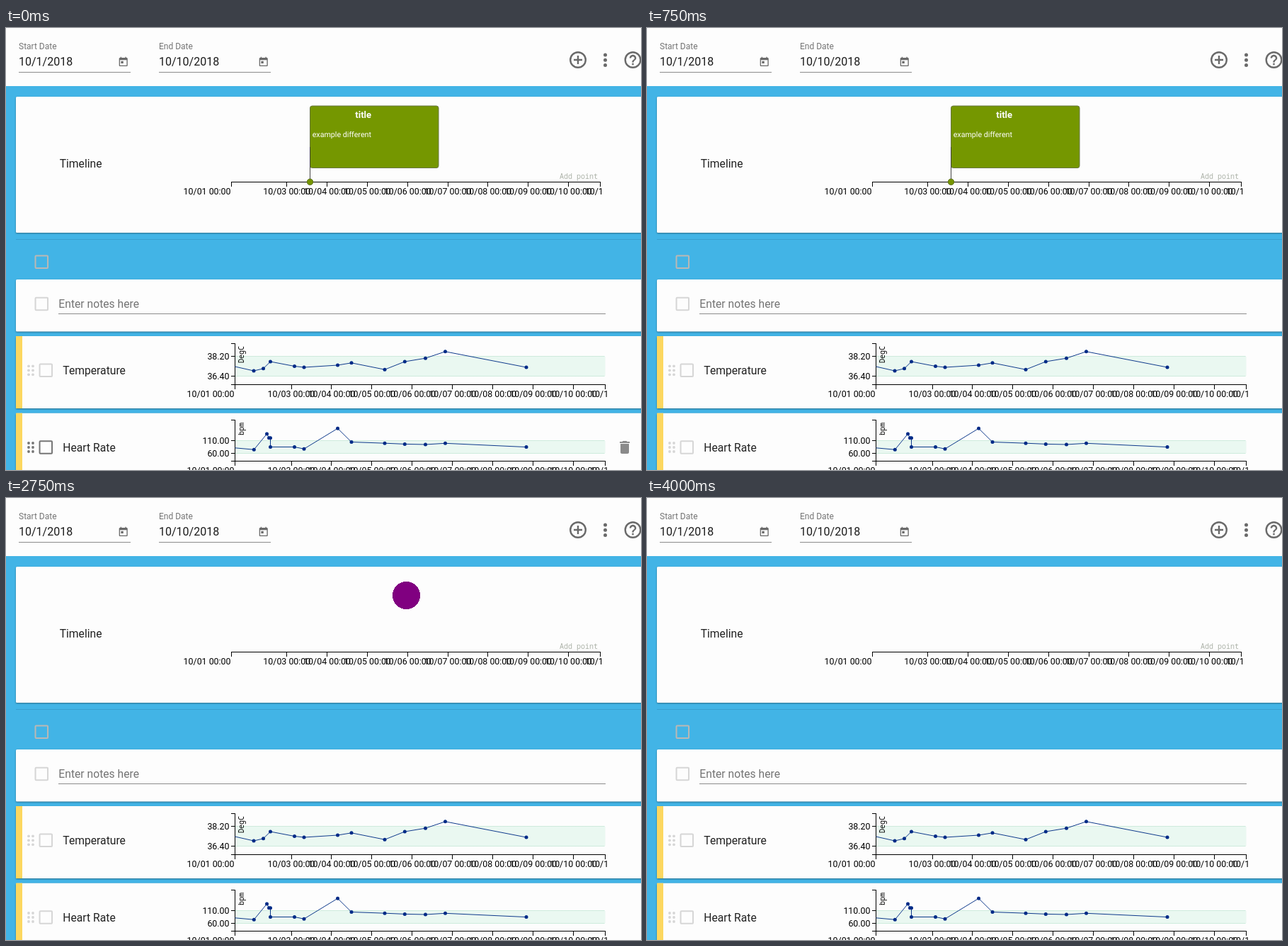
These frames come from a looping animation (897 px wide and 624 px high, 5000 ms). An HTML page:

```html
<!DOCTYPE html>
<html lang="en">
<head>
<meta charset="utf-8">
<title>Timeline</title>
<style>
  html, body { margin: 0; width: 100%; height: 100%; overflow: hidden; background: #fdfdfd; }
  svg { display: block; font-family: Roboto, sans-serif; }
  .card { fill: #fdfdfd; filter: drop-shadow(0 1.5px 1px rgba(0, 0, 0, .4)); }
  .label { font-size: 15.7px; fill: #212121; }
  .hint { font-size: 12px; fill: #757575; }
  .date { font-size: 16px; fill: #1c1c1c; }
  .tick { font-size: 12.4px; fill: #000; }
  .mono { font: 10px "Noto Sans Mono", monospace; }
  .axis { fill: none; stroke: #000; shape-rendering: crispEdges; }
  .rule { stroke: #8c8c8c; shape-rendering: crispEdges; }
  .icon { fill: #6a6a6a; }
  .ring { fill: none; stroke: #6a6a6a; stroke-width: 2.4; }
  .band { fill: #eaf8f1; }
  .limit { stroke: #a9dcc2; stroke-dasharray: 1 1; shape-rendering: crispEdges; }
  .series { fill: none; stroke: #0f3a8c; }
  .dot { fill: #002b87; }
  .box { fill: none; stroke: currentColor; stroke-width: 2; }
  .grip { fill: currentColor; }
  .faint { color: #d6d6d6; }

  .heart, .notes, .trash, .event, .tools, .press { animation: 5s step-end infinite; }
  .heart { animation-name: heart; }
  .notes { animation-name: notes; }
  .trash { animation-name: trash; }
  .event { animation-name: event; }
  .tools { animation-name: tools; }
  .press { animation-name: press; }
  @keyframes heart { 0% { color: #757575; } 10% { color: #b0b0b0; } 15%, 100% { color: #d6d6d6; } }
  @keyframes notes { 0% { color: #d6d6d6; } 10% { color: #b8b8b8; } 15%, 100% { color: #d6d6d6; } }
  @keyframes trash { 0% { visibility: visible; } 10%, 100% { visibility: hidden; } }
  @keyframes event { 0% { opacity: 1; } 55%, 100% { opacity: 0; } }
  @keyframes tools { 0% { visibility: hidden; } 20% { visibility: visible; } 55%, 100% { visibility: hidden; } }
  @keyframes press { 0% { visibility: hidden; } 55% { visibility: visible; } 60%, 100% { visibility: hidden; } }
</style>
</head>
<body>
<svg id="stage" width="897" height="624" viewBox="0 0 897 624" xmlns="http://www.w3.org/2000/svg"></svg>
<script>
const icons = {
  today: 'M19 3h-1V1h-2v2H8V1H6v2H5c-1.1 0-2 .9-2 2v14c0 1.1.9 2 2 2h14c1.1 0 2-.9 2-2V5c0-1.1-.9-2-2-2zm0 16H5V8h14v11zM7 10h5v5H7z',
  bin: 'M6 19c0 1.1.9 2 2 2h8c1.1 0 2-.9 2-2V7H6v12zM19 4h-3.5l-1-1h-5l-1 1H5v2h14V4z',
  up: 'M12 8l-6 6 1.41 1.41L12 10.83l4.59 4.58L18 14z',
  pen: 'M3 17.25V21h3.75L17.81 9.94l-3.75-3.75L3 17.25zM20.71 7.04c.39-.39.39-1.02 0-1.41l-2.34-2.34c-.39-.39-1.02-.39-1.41 0l-1.83 1.83 3.75 3.75 1.83-1.83z',
  query: 'M11 18h2v-2h-2v2zM12 6c-2.21 0-4 1.79-4 4h2c0-1.1.9-2 2-2s2 .9 2 2c0 2-3 1.75-3 5h2c0-2.25 3-2.5 3-5 0-2.21-1.79-4-4-4z',
};

const text = (x, y, cls, str, extra = '') => `<text x="${x}" y="${y}" class="${cls}" ${extra}>${str}</text>`;
const rect = (x, y, w, h, attrs) => `<rect x="${x}" y="${y}" width="${w}" height="${h}" ${attrs}/>`;
const circle = (x, y, r, attrs) => `<circle cx="${x}" cy="${y}" r="${r}" ${attrs}/>`;
const rule = (x1, x2, y, cls = 'rule') => `<path d="M${x1} ${y}H${x2}" class="${cls}"/>`;
const icon = (name, x, y, scale = 1, attrs = 'class="icon"') =>
  `<path d="${icons[name]}" transform="translate(${x} ${y}) scale(${scale})" ${attrs}/>`;
const card = (y, h) => rect(14, y, 900, h, 'rx="1.5" class="card"');
const checkbox = (x, y) => rect(x - 8.75, y - 8.75, 17.5, 17.5, 'rx="1" class="box"');
const grip = y => [32, 38].map(x => [-6, 0, 6].map(d => circle(x, y + d, 1.9, 'class="grip"')).join('')).join('');
const anchor = a => `text-anchor="${a}"`;

function dateAxis(id, left, right, y, firstDay, step) {
  let path = `M${left} ${y + 6}V${y}H${right}V${y + 6}`;
  let labels = text(left - 1, y + 17.5, 'tick', '10/01 00:00', anchor('end'));
  for (let i = 0; i < 9; i++) {
    const x = firstDay + i * step;
    if (x < right) path += `M${Math.floor(x) + .5} ${y}v6`;
    labels += text(x, y + 17.5, 'tick', `10/${String(i + 3).padStart(2, '0')} 00:00`, anchor('middle'));
  }
  return `<clipPath id="${id}">${rect(0, 0, right + 2.5, 624, '')}</clipPath>
    <g clip-path="url(#${id})"><path d="${path}" class="axis"/>${labels}</g>`;
}

function chart({ id, top, base, unit, limits, points }) {
  const [high, low] = limits;
  const ticks = limits.map(l => `M323.5 ${l.y}h-6`).join('');
  return rect(323.5, high.y, 523, low.y - high.y, 'class="band"') +
    limits.map(l => rule(324, 846, l.y, 'limit') + text(315.5, l.y + 4.2, 'tick', l.value, anchor('end'))).join('') +
    `<path d="M317.5 ${top}h6V${base}h-6${ticks}" class="axis"/>` +
    dateAxis(id, 323.5, 846.5, base, 403, 56.95) +
    text(0, 0, 'mono', unit, `${anchor('end')} transform="translate(335.5 ${top + 3.5}) rotate(-90)"`) +
    `<polyline points="${points.join(' ')}" class="series"/>` +
    points.slice(1).map(([x, y]) => circle(x, y, 2.5, 'class="dot"')).join('');
}

const dateField = (x, label, value) =>
  text(x, 30, 'hint', label) + text(x, 53, 'date', value) + rule(x, x + 158, 62.5) + icon('today', x + 139.7, 40, .67);

const header = dateField(18, 'Start Date', '10/1/2018') + dateField(216, 'End Date', '10/10/2018') +
  circle(808, 45, 10.8, 'class="ring"') +
  '<path d="M802 45h12M808 39v12" class="ring"/>' +
  [38, 45.2, 52.4].map(y => circle(846.5, y, 2.5, 'class="icon"')).join('') +
  circle(885.5, 45, 10.8, 'class="ring"') + icon('query', 871.1, 30.6, 1.2);

const eventBox = `<g class="event">
  <path d="M429.5 168V217" stroke="#444"/>
  ${circle(429.5, 217.3, 4.3, 'fill="#759500" stroke="#5d7020"')}
  ${rect(429.5, 110, 181.5, 87.5, 'rx="3" fill="#759700" stroke="#697743"')}
  <path d="M429.5 168V213" stroke="#444"/>
  ${text(504.7, 127, '', 'title', anchor('middle') + ' font-size="13" font-weight="700" fill="#fff"')}
  ${text(432.7, 154, '', 'example different', 'font-size="10.7" fill="#fff" text-rendering="geometricPrecision"')}
  <g class="tools">
    ${icon('up', 433, 119, 1, 'fill="#fff"')}${icon('bin', 553, 119, 1, 'fill="#fff"')}${icon('pen', 463, 165, 1, 'fill="#fff"')}
  </g></g>`;

const timeline = card(97, 192) + text(75.7, 197, 'label', 'Timeline') +
  dateAxis('timelineClip', 318.5, 839.5, 217.5, 396.8, 56.8) +
  text(836, 213, 'mono', 'Add point', anchor('end') + ' fill="#acb2a8"') + eventBox +
  circle(565.5, 137.5, 19.5, 'class="press" fill="#800080" shape-rendering="crispEdges"');

const notes = rule(14, 897, 298.5, 'divider" stroke="#389fd0') +
  `<g color="#bbb8b4">${checkbox(50.3, 330.3)}</g>` + card(355, 73.5) +
  `<g class="notes">${checkbox(50.3, 389.5)}</g>` +
  text(74.3, 394.5, 'label', 'Enter notes here', 'style="fill:#747474"') + rule(74, 847, 403.5);

const row = (y, h, name, state, plot) => card(y, h) + rect(14, y, 9, h, 'fill="#fcd75f"') +
  `<g class="${state}">${grip(y + 48.3)}${checkbox(56.3, y + 48.3)}</g>` +
  text(80.3, y + 54, 'label', name) + chart(plot);

const temperature = row(435, 102, 'Temperature', 'faint', {
  id: 'temperatureClip', top: 445.5, base: 503.5, unit: 'DegC',
  limits: [{ y: 463.5, value: '38.20' }, { y: 491.5, value: '36.40' }],
  points: [[323.5, 478], [350, 484], [363.5, 480.8], [373.5, 471], [407.5, 477.5], [421, 479], [468.5, 476],
    [488, 472.8], [535, 482.2], [563.3, 471], [592.5, 466.2], [620.5, 456.8], [735, 479]],
});

const heartRate = row(543.7, 102, 'Heart Rate', 'heart', {
  id: 'heartClip', top: 553.5, base: 611.5, unit: 'bpm',
  limits: [{ y: 582.5, value: '110.00' }, { y: 600.5, value: '60.00' }],
  points: [[323.5, 592.8], [350.3, 595.2], [368.5, 573], [371.5, 578.8], [373.5, 578.8], [373.5, 591.5], [407.5, 591.5],
    [421, 594.2], [468.5, 565.3], [488, 584.5], [535, 586.2], [563.3, 587.4], [592.5, 588], [620.5, 586.3], [735, 591.6]],
}) + icon('bin', 862, 580, 1, 'class="trash" fill="#8a8a8a"');

document.getElementById('stage').innerHTML =
  rect(0, 0, 897, 624, 'fill="#fdfdfd"') + rect(0, 82, 897, 542, 'fill="#42b4e6"') +
  header + timeline + notes + temperature + heartRate;
</script>
</body>
</html>
```
